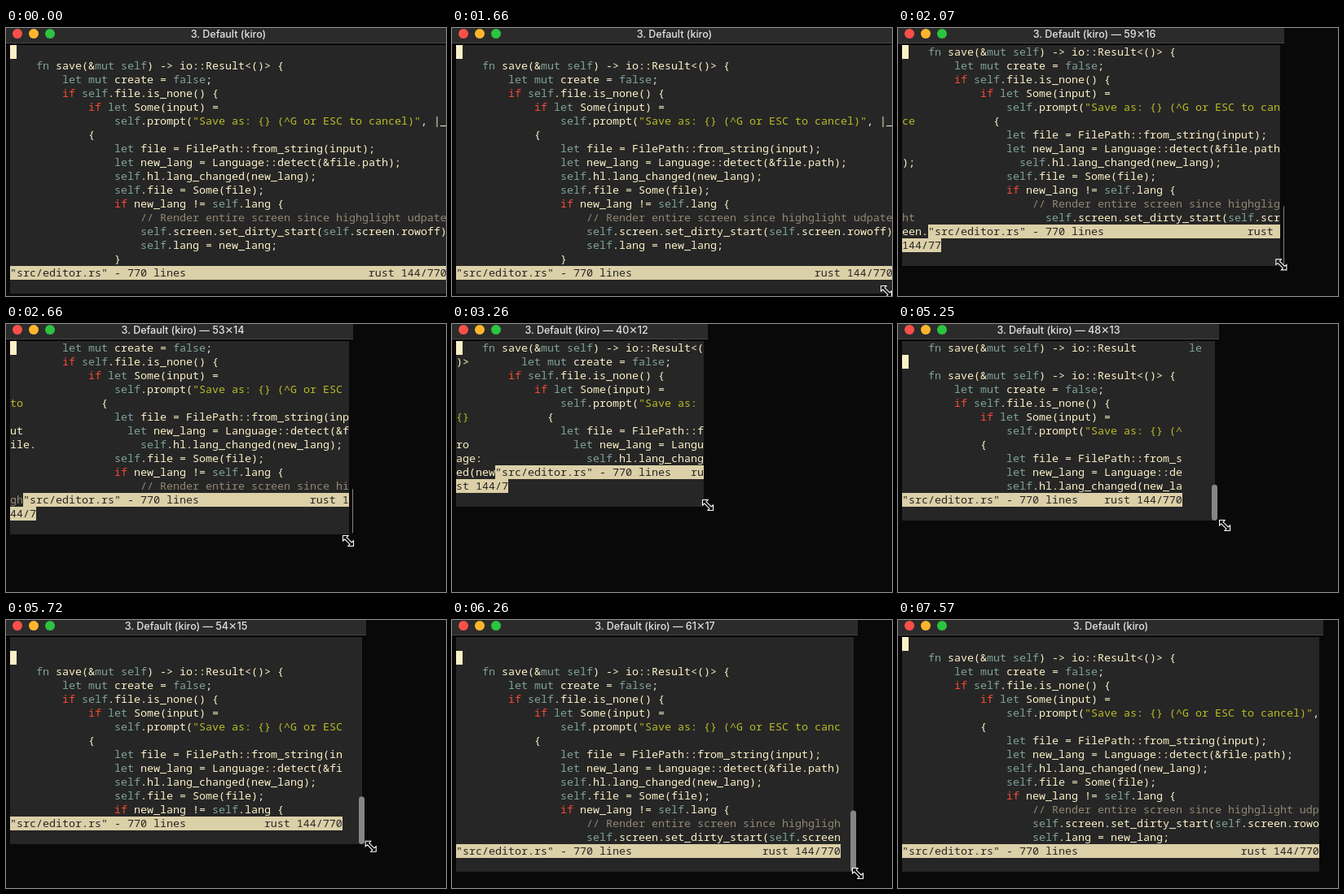
Animation, 540 px wide and 330 px high, one loop 8270 ms. Source, as an HTML page:

```html
<!DOCTYPE html>
<html lang="en">
<head>
<meta charset="utf-8">
<title>Terminal resize</title>
<style>
html, body { margin: 0; width: 540px; height: 330px; overflow: hidden; background: #090909; }
svg { display: block; }
.code { font: 13.333px "Noto Sans Mono", "DejaVu Sans Mono", monospace; white-space: pre; }
.title { font: 500 12.5px Inter, "DejaVu Sans", sans-serif; fill: #e4e4e4; text-anchor: middle; }
</style>
</head>
<body>
<svg width="540" height="330" viewBox="0 0 540 330">
  <defs><clipPath id="frame"><rect id="clip" width="546" height="330"/></clipPath></defs>
  <rect width="540" height="330" fill="#090909"/>
  <g clip-path="url(#frame)">
    <rect width="600" height="18" fill="#2b2b2b"/>
    <rect y="18" width="600" height="1" fill="#484848"/>
    <rect y="19" width="600" height="2" fill="#050505"/>
    <circle cx="14" cy="7" r="6" fill="#fc4f4a"/>
    <circle cx="34" cy="7" r="6" fill="#fdb62c"/>
    <circle cx="54" cy="7" r="6" fill="#2bc440"/>
    <text id="title" class="title" y="11.5"></text>
    <rect id="screen" x="5" y="21" fill="#262626"/>
    <g id="text" class="code"></g>
    <rect id="thumb" width="7" rx="3.5" fill="#858585"/>
  </g>
  <path id="pointer" d="M-6.5-6.5H0L-2-4.2 4.2 2 6.5 0V6.5H0L2 4.2-4.2-2-6.5 0Z" fill="#000" stroke="#fff" stroke-width="1.1"/>
</svg>
<script>
const LOOP = 8270, CW = 8, RH = 17, LEFT = 5, TOP = 21;
const GROW = 4300;
const STEP = 60, BURSTS = [0, 780, 1660, 2310, 2480, 3310, 4310, 5190, 6020, 6790, 7150];
const COLORS = { fg: "#fbf1c7", key: "#7fa399", ctl: "#fb4934", str: "#b8bb26", com: "#928774", bar: "#262626" };
const BAR_BG = "#dcd0a8";

const SOURCE = `
    fn save(&mut self) -> io::Result<()> {
        let mut create = false;
        if self.file.is_none() {
            if let Some(input) =
                self.prompt("Save as: {} (^G or ESC to cancel)", |_, _, _| Ok(()))?
            {
                let file = FilePath::from_string(input);
                let new_lang = Language::detect(&file.path);
                self.hl.lang_changed(new_lang);
                self.file = Some(file);
                if new_lang != self.lang {
                    // Render entire screen since highglight udpated
                    self.screen.set_dirty_start(self.screen.rowoff);
                    self.lang = new_lang;
                }
            }`.split("\n");

// time, pointer x, pointer y
const PATH = [
  [780, 550, 339], [1120, 540, 329], [1659, 540, 329], [1660, 533, 324],
  [2080, 460, 286], [2480, 460, 286], [2660, 420, 267], [3260, 314, 223],
  [3770, 229, 171], [4310, 229, 171], [5130, 374, 238], [5250, 401, 248],
  [5960, 480, 300], [6260, 498, 312], [6620, 519, 324], [7150, 519, 324], [7500, 519, 342]
];

const $ = id => document.getElementById(id);
const set = (id, attrs) => { for (const k in attrs) $(id).setAttribute(k, attrs[k]); };
const escape = s => s.replace(/&/g, "&amp;").replace(/</g, "&lt;");
const cells = (s, kind) => [...s].map(c => ({ c, kind }));

function highlight(line) {
  const parts = line.match(/\/\/.*|"[^"]*"|\w+|\W/g) || [];
  return parts.flatMap(p => cells(p,
    p.startsWith("//") ? "com" :
    p.length > 1 && p[0] === '"' ? "str" :
    p === "if" ? "ctl" :
    /^(fn|let|mut|self|false)$/.test(p) ? "key" : "fg"));
}
const CODE = SOURCE.map(highlight);
const SCROLLBACK = [
  ...highlight("    fn save(&mut self) -> io::Result        "),
  ...cells("le", "key")
];

// The picture advances in even steps within each burst of movement.
function stepped(t) {
  const from = BURSTS.filter(b => b <= t).pop();
  return from + Math.floor((t - from) / STEP) * STEP;
}

function pointerAt(t) {
  let i = 0;
  while (i < PATH.length - 2 && t >= PATH[i + 1][0]) i++;
  const [a, b] = [PATH[i], PATH[i + 1]];
  const k = Math.min(1, Math.max(0, (t - a[0]) / (b[0] - a[0])));
  return [a[1] + (b[1] - a[1]) * k, a[2] + (b[2] - a[2]) * k];
}

// Terminal size in cells; it trails the pointer slightly while growing.
function sizeAt(t) {
  if (t < 1700) return { cols: 67, rows: 18 };
  t = Math.min(t, 7000);
  const [x, y] = pointerAt(t > GROW ? Math.max(GROW, t - 50) : t);
  return { cols: Math.floor((x - 4) / CW), rows: Math.floor((y - 19) / RH) };
}

function statusLine(cols) {
  const left = '"src/editor.rs" - 770 lines', right = "rust 144/770";
  const room = cols - left.length;
  return cells(left + (room > right.length ? right.padStart(room) : " ".repeat(Math.max(0, room))), "bar");
}

// Lines drawn for the older size, then wrapped to the present width.
function layoutRows(t, term) {
  const editor = sizeAt(t - (t > GROW ? 210 : 150));
  const mid = sizeAt(t - 90).cols;
  const limit = Math.min(editor.cols, mid);
  const lines = [...CODE.slice(0, editor.rows - 2), statusLine(editor.cols)];
  const rows = [];
  let run = [];
  lines.forEach((line, i) => {
    run = run.concat(line.slice(0, limit));
    const joined = term.cols < limit && line.length >= mid && i < lines.length - 1;
    if (joined) return;
    do rows.push(run.splice(0, term.cols)); while (run.length);
  });
  rows.push([]);
  const extra = term.rows - rows.length;
  if (extra <= 0) return { rows: rows.slice(-term.rows), cursor: 0 };
  const above = Array.from({ length: extra }, () => []);
  if (t > GROW && t < 5600) above[extra - 1] = SCROLLBACK.slice(0, term.cols);
  return { rows: [...above, ...rows], cursor: extra };
}

function drawRow(row, r) {
  const y = TOP + r * RH;
  let out = "";
  for (let i = 0, j; i < row.length; i = j) {
    const kind = row[i].kind;
    for (j = i; j < row.length && row[j].kind === kind;) j++;
    const x = LEFT + i * CW;
    if (kind === "bar") out += `<rect x="${x}" y="${y}" width="${(j - i) * CW}" height="${RH}" fill="${BAR_BG}"/>`;
    const s = row.slice(i, j).map(o => o.c).join("");
    out += `<text x="${x}" y="${y + 13}" fill="${COLORS[kind]}" xml:space="preserve">${escape(s)}</text>`;
  }
  return out;
}

// The thumb shows the visible share of all lines kept by the terminal.
function thumbHeight(rows, t) {
  const kept = t > GROW ? 65 : 58;
  return Math.max(24, rows * rows * RH / kept);
}

let shown = "";
function render(t) {
  const term = sizeAt(t);
  const frame = t > GROW ? term : sizeAt(t - STEP);
  const width = frame.cols * CW + 10;
  set("clip", { width: term.cols * CW + 10 });
  set("screen", { width: term.cols * CW, height: term.rows * RH });

  const label = `${frame.cols}✕${frame.rows}`;
  const sized = t > 1700 && t < 7210;
  $("title").textContent = !sized ? "3. Default (kiro)"
    : width < 290 ? `3. ${label}` : `3. Default (kiro) — ${label}`;
  set("title", { x: width / 2 });

  const { rows, cursor } = layoutRows(t, term);
  const html = `<rect x="${LEFT}" y="${TOP + cursor * RH}" width="${CW}" height="${RH}" fill="${COLORS.fg}"/>`
    + rows.map(drawRow).join("");
  if (html !== shown) $("text").innerHTML = shown = html;

  const h = thumbHeight(frame.rows, t);
  set("thumb", {
    x: width - 9, y: TOP + frame.rows * RH - h, height: h,
    opacity: t < 1720 || t >= 6850 ? 0 : t >= 6790 ? 0.5 : 1
  });

  const [x, y] = pointerAt(t);
  set("pointer", { transform: `translate(${x.toFixed(1)} ${y.toFixed(1)})` });
}

const start = performance.now();
function tick() {
  render(stepped((performance.now() - start) % LOOP));
  requestAnimationFrame(tick);
}
tick();
</script>
</body>
</html>
```
